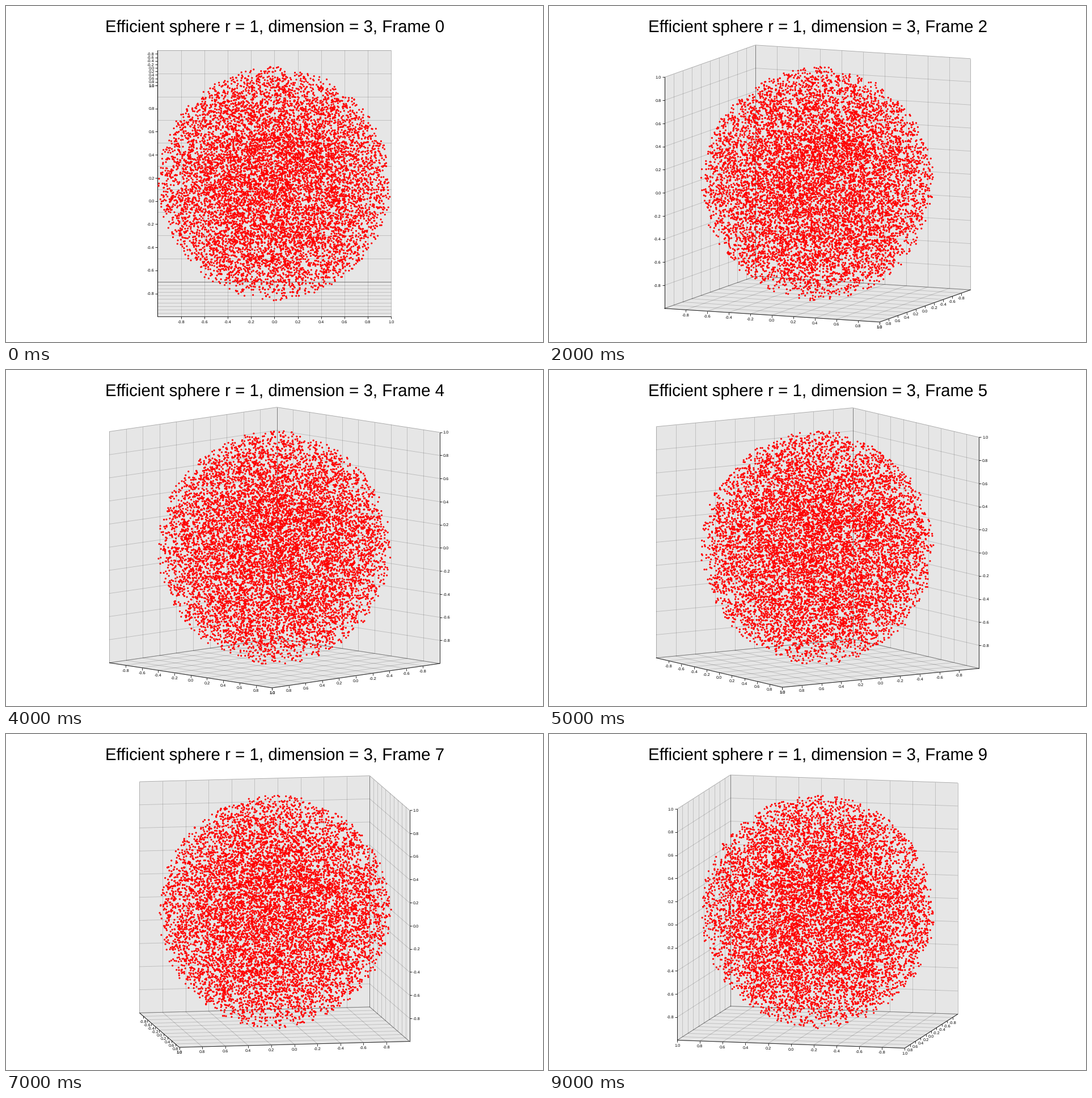
Animation, 947 px wide and 592 px high, one loop 10000 ms. Source, as a matplotlib script:

```python
import numpy as np
import matplotlib.pyplot as plt
from matplotlib.animation import FuncAnimation
from matplotlib.collections import LineCollection, PolyCollection

W, H, DPI = 947, 592, 64
PX = 72 / DPI                      # points per pixel
CX, CY, SCALE = 473.5, 312.8, 206
TILT, STEP = 0.15, 0.2             # radians: elevation, turn per frame
COUNT = 10000
TICKS = np.arange(-4, 6) / 5
GRID = TICKS[:-1]

plt.rcParams["font.family"] = "Liberation Sans"
plt.rcParams["text.hinting"] = "no_hinting"
fig = plt.figure(figsize=(W / DPI, H / DPI), dpi=DPI, facecolor="white")
ax = fig.add_axes([0, 0, 1, 1])
ax.set_xlim(0, W)
ax.set_ylim(H, 0)
ax.axis("off")

# uniform samples in the unit ball
rng = np.random.default_rng(3)
ball = rng.normal(size=(COUNT, 3))
ball *= (rng.random(COUNT) ** (1 / 3) / np.linalg.norm(ball, axis=1))[:, None]


def lines(alpha, width, z):
    return ax.add_collection(LineCollection(
        [], colors="black", alpha=alpha, linewidths=width * PX, zorder=z))


walls = ax.add_collection(PolyCollection(
    [], facecolors="#e6e6e6", edgecolors="none", zorder=1))
grid = lines(0.18, 0.9, 2)
edges = lines(0.3, 0.9, 3)
axes = lines(0.8, 1, 4)
# one size per dot keeps their places free of pixel rounding
dots = ax.scatter(np.zeros(COUNT), np.zeros(COUNT),
                  s=np.full(COUNT, (3.2 * PX) ** 2),
                  color="red", linewidths=0, zorder=5)
title = ax.text(473.7, 46, "", size=29.5 * PX, ha="center", va="baseline")
labels = [ax.text(0, 0, "", size=7.33 * PX, va="baseline", zorder=6)
          for _ in range(3 * len(TICKS))]


def project(points, turn):
    x, y, z = np.asarray(points, float).T
    c, s = np.cos(turn), np.sin(turn)
    depth = x * s + y * c
    return np.column_stack([
        CX + SCALE * (x * c - y * s),
        CY + SCALE * (depth * np.sin(TILT) - z * np.cos(TILT))])


def on_axis(axis, corner, values):
    """Points along one axis, the other two coordinates taken from corner."""
    pts = np.tile(np.array(corner, float), (len(values), 1))
    pts[:, axis] = values
    return pts


def wall_lines(axis, side, values):
    """Lines across the wall where the given axis equals side."""
    a, b = [k for k in range(3) if k != axis]
    for run, fixed in ((a, b), (b, a)):
        for v in values:
            corner = np.zeros(3)
            corner[axis], corner[fixed] = side, v
            yield on_axis(run, corner, [-1, 1])


def draw(i):
    turn = STEP * i
    c, s = np.cos(turn), np.sin(turn)
    fx, fy = 1, 1 if c >= 0 else -1          # nearest corner

    backs = ((0, -fx), (1, -fy), (2, -1))
    borders = [[project(p, turn) for p in wall_lines(k, side, (-1, 1))]
               for k, side in backs]
    walls.set_verts([np.vstack([b[0], b[1][::-1]]) for b in borders])
    edges.set_segments([seg for b in borders for seg in b])
    grid.set_segments([project(p, turn) for k, side in backs
                       for p in wall_lines(k, side, GRID)])

    # an axis seen almost end-on moves to the top edge of its side wall
    x_spot = ((0, -fy, 1), "left") if abs(c) < 0.1 else ((0, fy, -1), "down")
    y_spot = ((-fx, 0, 1), "left") if abs(s) < 0.1 else ((fx, 0, -1), "down")
    if fx * s - fy * c > 0:
        z_corner = (fx, -fy, 0)
    else:
        z_corner = (-fx, fy, 0)
    z_side = "right" if z_corner[0] * c - z_corner[1] * s > 0 else "left"

    segs, pool = [], iter(labels)
    for k, (corner, side) in enumerate((x_spot, y_spot, (z_corner, z_side))):
        dx, dy = {"left": (-1, 0), "right": (1, 0), "down": (0, 1)}[side]
        segs.append(project(on_axis(k, corner, [-1, 1]), turn))
        for v, (px, py) in zip(TICKS, project(on_axis(k, corner, TICKS), turn)):
            segs.append([(px, py), (px + 4 * dx, py + 4 * dy)])
            text = next(pool)
            text.set_text(f"{v:.1f}")
            text.set_ha({"left": "right", "right": "left"}.get(side, "center"))
            text.set_position((px + 6 * dx, py + (11.2 if dy else 2.6)))
    axes.set_segments(segs)

    dots.set_offsets(project(ball, turn))
    title.set_text(f"Efficient sphere r = 1, dimension = 3, Frame {i}")
    return [walls, grid, edges, axes, dots, title, *labels]


anim = FuncAnimation(fig, draw, frames=10, interval=1000, repeat=True,
                     repeat_delay=0, blit=False)
plt.show()
```
